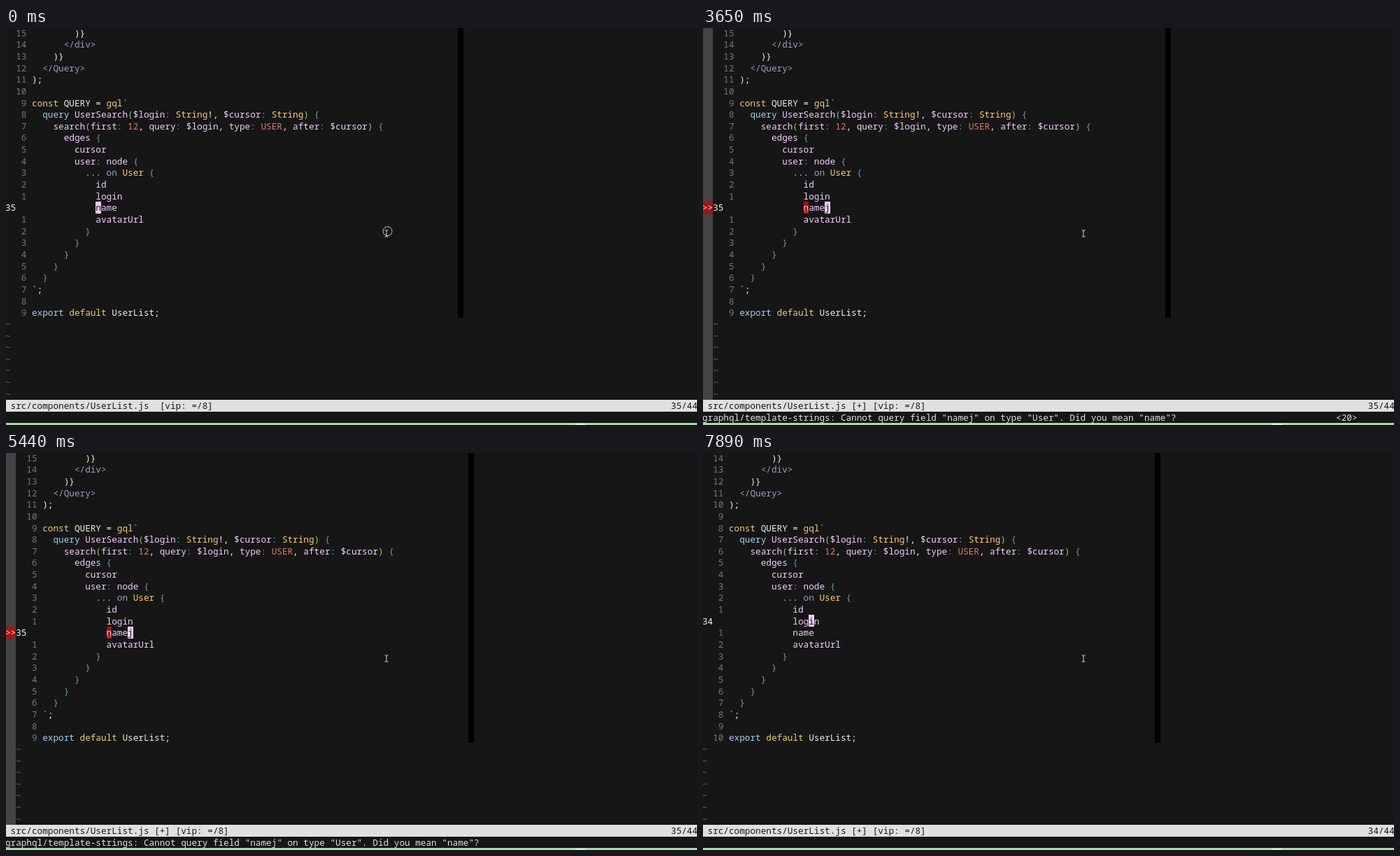
Write an HTML page with a canvas that moves like this. It is 988 by 567 pixels and loops after 8000 ms.

```html
<!DOCTYPE html>
<html lang="en">
<head>
<meta charset="utf-8">
<title>Editor session</title>
<style>
html, body { margin: 0; width: 100%; height: 100%; overflow: hidden; background: #161616; }
canvas { display: block; }
</style>
</head>
<body>
<canvas id="stage" width="988" height="567"></canvas>
<script>
const ctx = document.getElementById("stage").getContext("2d");
const LOOP = 8000;
const CW = 7.615, RH = 16.65, X0 = -1.1, Y0 = -1.8;
const BG = "#161616", DIM = "#6f6f6f", LIGHT = "#e0e0e0", RED = "#a3140e", PINK = "#f3cdff";

const COLORS = {
  w: "#efefe6", y: "#f0cb7c", b: "#a3d0ee", p: PINK, g: "#a2bd7c",
  t: "#68a296", r: "#e2786c", o: "#ffc873", v: "#9a9dc4"
};

// "^x" switches to color x
const CODE = [
  "^w        )}",
  "^v      </div>",
  "^w    )}",
  "^v  </Query>",
  "^w);",
  "",
  "^yconst^w QUERY = ^ygql^g`",
  "^b  query ^pUserSearch^g(^p$login^t: ^oString^w!, ^p$cursor^t: ^oString^g) ^t{",
  "^p    search^g(^pfirst^t: ^r12^w, ^pquery^t: ^p$login^w, ^ptype^t: ^rUSER^w, ^pafter^t: ^p$cursor^g) ^t{",
  "^p      edges ^t{",
  "^p        cursor",
  "^p        user^t: ^pnode ^t{",
  "^b          ... ^von ^oUser ^t{",
  "^p            id",
  "^p            login",
  "^p            name",
  "^p            avatarUrl",
  "^t          }",
  "^t        }",
  "^t      }",
  "^t    }",
  "^t  }",
  "^g`^w;",
  "",
  "^bexport ^ydefault ^wUserList;"
];
const FIRST = 20, NAME = 15, LOGIN = 14, GUTTER = 5;
const ERROR = 'Cannot query field "namej" on type "User". Did you mean "name"?';
const LINT = "graphql/template-strings: " + ERROR;

const px = c => Math.round(X0 + c * CW);
const py = r => Math.round(Y0 + r * RH);

function cells(col, row, w, h, color) {
  ctx.fillStyle = color;
  ctx.fillRect(px(col), py(row), px(col + w) - px(col), py(row + h) - py(row));
}

function text(str, col, row, color) {
  ctx.fillStyle = color;
  [...str].forEach((ch, i) => {
    if (ch !== " ") ctx.fillText(ch, X0 + (col + i) * CW, Y0 + row * RH + 13.4);
  });
}

function block(ch, col, row, color) {
  cells(col, row, 1, 1, color);
  text(ch, col, row, BG);
}

function codeLine(line, col, row, flat) {
  for (const run of line.split("^").slice(1)) {
    const str = run.slice(1);
    text(str, col, row, flat || COLORS[run[0]]);
    col += str.length;
  }
}

function tildes(col, from) {
  for (let r = from; r < 32; r++) text("~", col, r, DIM);
}

function status(row, left, right, active) {
  ctx.fillStyle = active ? LIGHT : "#333";
  ctx.fillRect(0, py(row), 988, py(row + 1) - py(row));
  const color = active ? BG : "#e4e4e4";
  text(left, 1, row, color);
  text(right, 130 - right.length, row, color);
}

// Code window: lines from..to, with an optional sign column
function codeWindow(s, from, to, height) {
  const shift = s.sign ? 2 : 0;
  const flat = s.split ? DIM : null;
  const cur = s.line ?? NAME;
  cells(80 + GUTTER + shift, 0, 1, to - from, "#000");
  if (s.sign) cells(0, 0, 2, height, s.split ? "#333" : "#444");
  for (let i = from; i < to; i++) {
    const row = i - from;
    if (i === cur) {
      text(String(FIRST + i), shift, row, "#f4f4f4");
    } else {
      text(String(Math.abs(i - cur)).padStart(4), shift, row, "#777");
    }
    const line = i === NAME ? CODE[i].replace("name", s.name || "name") : CODE[i];
    codeLine(line, GUTTER + shift, row, flat);
  }
  if (s.sign) {
    const row = NAME - from;
    cells(0, row, 2, 1, RED);
    text(">>", 0, row, PINK);
    if (!s.split) {
      const col = GUTTER + shift + 12;
      cells(col, row, 1, 1, RED);
      text("n", col, row, PINK);
      ctx.fillStyle = "#f0504a";
      ctx.fillRect(px(col), py(row + 1) - 3, px(col + 1) - px(col), 1);
    }
  }
  const mark = s.dirty ? " [+] " : "  ";
  status(height, "src/components/UserList.js" + mark + "[vip: =/8]",
    FIRST + cur + "/44", !s.split);
}

function pointer(ring) {
  ctx.strokeStyle = "#c9c9c9";
  ctx.lineWidth = 1;
  ctx.beginPath();
  ctx.moveTo(541.5, 288.5);
  ctx.quadraticCurveTo(544, 288.5, 544, 290.5);
  ctx.quadraticCurveTo(544, 288.5, 546.5, 288.5);
  ctx.moveTo(544, 290);
  ctx.lineTo(544, 297);
  ctx.moveTo(541.5, 298.5);
  ctx.quadraticCurveTo(544, 298.5, 544, 296.5);
  ctx.quadraticCurveTo(544, 298.5, 546.5, 298.5);
  ctx.stroke();
  if (ring) {
    ctx.beginPath();
    ctx.arc(545.5, 290.2, 6.5, 0, Math.PI * 2);
    ctx.stroke();
  }
}

const insert = { msg: "-- INSERT --", cursorColor: LIGHT };
const linted = { sign: true, dirty: true, name: "namej", msg: LINT, cursor: [23, "j"] };
const preview = { sign: true, dirty: true, name: "namej", split: true };

const STATES = [
  { at: 0, cursor: [17, "n"], ring: true },
  { at: 150, cursor: [17, "n"] },
  { at: 1700, ...insert, cursor: [21, " "] },
  { at: 2000, ...insert, cursor: [22, " "], name: "namej", dirty: true },
  { at: 2450, ...linted },
  { at: 3650, ...linted, keys: "<20>" },
  { at: 3860, ...preview },
  { at: 5210, ...preview, msg: ":q" },
  { at: 5440, ...linted },
  { at: 6340, ...linted, name: "name", cursor: [22, "e"] },
  { at: 6690, dirty: true, cursor: [20, "e"] },
  { at: 7890, dirty: true, line: LOGIN, cursor: [20, "i"] }
];

function draw(s) {
  ctx.fillStyle = BG;
  ctx.fillRect(0, 0, 988, 567);
  ctx.font = CW / 0.6 + 'px "Noto Sans Mono", "DejaVu Sans Mono", monospace';
  ctx.textBaseline = "alphabetic";

  if (s.split) {
    codeWindow(s, 11, 21, 10);
    cells(80 + GUTTER, 11, 1, 1, "#000");
    text("1", 0, 11, "#f4f4f4");
    text(ERROR, GUTTER, 11, LIGHT);
    tildes(0, 12);
    status(32, "ALEPreviewWindow [-]", "1/1", true);
    if (s.msg) block(" ", s.msg.length, 33, LIGHT);
    else block(ERROR[0], GUTTER, 11, LIGHT);
  } else {
    codeWindow(s, 0, CODE.length, 32);
    tildes(s.sign ? 2 : 0, CODE.length);
    block(s.cursor[1], s.cursor[0], s.line ?? NAME, s.cursorColor || PINK);
  }
  if (s.msg) text(s.msg, 0, 33, LIGHT);
  if (s.keys) text(s.keys, 119, 33, LIGHT);

  ctx.fillStyle = "#a8dba8";
  ctx.fillRect(0, 564, 988, 3);
  ctx.fillStyle = "#dcebd9";
  ctx.fillRect(814, 565, 14, 2);
  pointer(s.ring);
}

const start = performance.now();
function tick() {
  const t = (performance.now() - start) % LOOP;
  draw(STATES.findLast(s => s.at <= t));
  requestAnimationFrame(tick);
}
tick();
</script>
</body>
</html>
```
